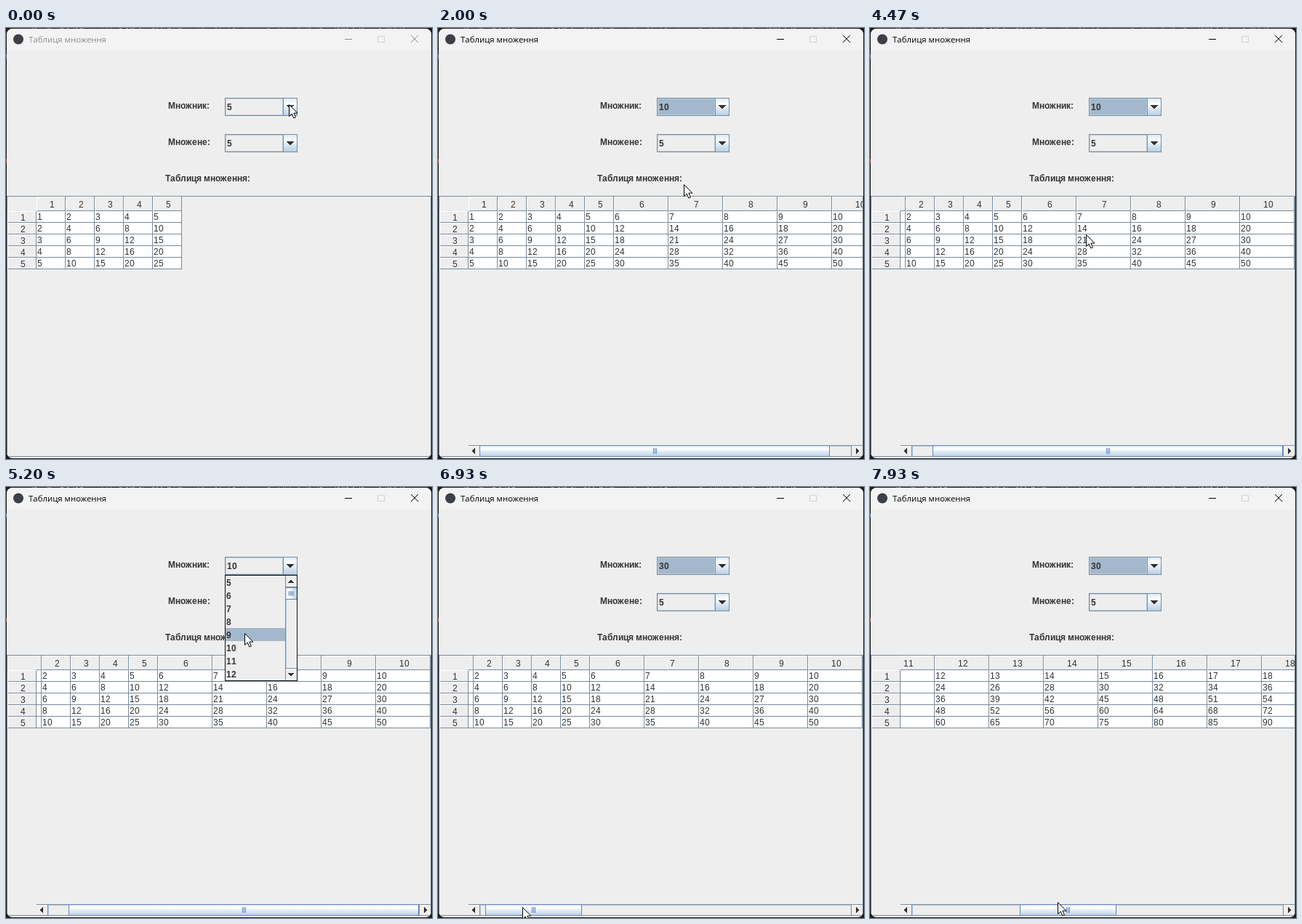
Recreate the animation shown at these times as an HTML page with a canvas. Size 586 by 593 pixels, loop 8 s.

```html
<!DOCTYPE html>
<html lang="uk">
<head>
<meta charset="utf-8">
<title>Таблиця множення</title>
<style>
html, body { margin: 0; width: 586px; height: 593px; overflow: hidden; background: #1c1c1e; }
canvas { display: block; }
</style>
</head>
<body>
<canvas id="stage" width="586" height="593"></canvas>
<script>
const g = document.getElementById('stage').getContext('2d', { alpha: false });
const LOOP = 8000, STEP = 1000 / 15;
const PANEL = '#eeeeee', LINE = '#7a8a99', SOFT = '#b8cfe5', INK = '#333333', PICK = '#a3b8cc', EDGE = '#6382bf';
const SANS = '"Liberation Sans", Arial, sans-serif';
const PLAIN = '12px ' + SANS, BOLD = 'bold 12px ' + SANS;
const TITLE = '11.4px "Open Sans", "Noto Sans", sans-serif';

const clamp = (v, lo, hi) => Math.max(lo, Math.min(hi, v));
const progress = (f, a, b) => clamp((f - a) / (b - a), 0, 1);
const smooth = p => p * p * (3 - 2 * p);
const drag = p => p ** 1.146;

// Pointer legs: first step, last step, end x, end y, easing
const legs = [
  [0, 1, 389, 106, smooth],
  [8, 17, 338, 215, smooth],
  [36, 49, 118, 571, smooth],
  [49, 53, 110, 579, smooth],
  [55, 58.5, 139, 577, drag],
  [60, 72, 393, 108, smooth],
  [73, 78, 328, 201, smooth],
  [78, 81, 331, 238, smooth],
  [88, 91, 329, 255, smooth],
  [93, 104, 116, 578, smooth],
  [107, 119, 258, 571, drag]
];

function mouseAt(f) {
  let x = 389, y = 105;
  for (const [a, b, tx, ty, ease] of legs) {
    const k = ease(progress(f, a, b));
    x += (tx - x) * k;
    y += (ty - y) * k;
  }
  return [Math.round(x), Math.round(y)];
}

const scrollAt = f => Math.round(33 * drag(progress(f, 55, 58.5)) + 570 * drag(progress(f, 107, 119)));
const wheelAt = f => 3 * clamp(f - 81, 0, 6);

function fill(x, y, w, h, color) {
  g.fillStyle = color;
  g.fillRect(x, y, w, h);
}

function outline(x, y, w, h, color) {
  g.strokeStyle = color;
  g.lineWidth = 1;
  g.strokeRect(x + 0.5, y + 0.5, w - 1, h - 1);
}

// Widget text advances by whole pixels
const advance = c => Math.round(g.measureText(c).width);

function text(s, x, y, font = PLAIN) {
  g.font = font;
  g.fillStyle = INK;
  for (const c of String(s)) {
    g.fillText(c, x, y);
    x += advance(c);
  }
}

function centred(s, x, w, y) {
  g.font = PLAIN;
  const tw = [...String(s)].reduce((sum, c) => sum + advance(c), 0);
  text(s, Math.round(x + (w - tw) / 2 + 1), y);
}

// Stepped arrow: tip between (x, y) and its neighbour, growing along (dx, dy)
function arrow(x, y, dx, dy, n) {
  for (let i = 0; i < n; i++) {
    if (dy) fill(x - i - 1, y + i * dy, 2 * i + 2, 1, INK);
    else fill(x + i * dx, y - i - 1, 1, 2 * i + 2, INK);
  }
}

function clipped(x, y, w, h, draw) {
  g.save();
  g.beginPath();
  g.rect(x, y, w, h);
  g.clip();
  draw();
  g.restore();
}

function gloss(x, y, w, h, across) {
  const s = across ? g.createLinearGradient(x, 0, x + w, 0) : g.createLinearGradient(0, y, 0, y + h);
  s.addColorStop(0, '#dde8f3');
  s.addColorStop(0.3, '#ffffff');
  s.addColorStop(0.6, '#dde8f3');
  s.addColorStop(1, SOFT);
  fill(x, y, w, h, s);
}

function backdrop() {
  fill(0, 0, 586, 593, '#1c1c1e');
  let seed = 7;
  for (let x = 30; x < 550; x += 3) {
    seed = (seed * 16807) % 2147483647;
    if (seed % 5 < 2) fill(x, 0, 1 + seed % 3, 1, '#77777c');
  }
  fill(0, 36, 1, 6, '#4d7090');
  fill(0, 180, 1, 5, '#a04a44');
}

function titleBar(active) {
  const ink = active ? '#000000' : '#8c8c8c';
  fill(0, 0, 586, 31, '#f3f3f3');
  g.fillStyle = '#3c3f45';
  g.beginPath();
  g.arc(17, 15.5, 7, 0, 7);
  g.fill();
  g.font = TITLE;
  g.fillStyle = ink;
  g.fillText('Таблиця множення', 31, 20);
  fill(466, 15, 10, 1, ink);
  outline(511, 11, 10, 9, '#d2d2d2');
  g.strokeStyle = ink;
  g.beginPath();
  g.moveTo(557, 10); g.lineTo(567, 20);
  g.moveTo(567, 10); g.lineTo(557, 20);
  g.stroke();
}

function combo(y, value, focused) {
  outline(301, y, 100, 25, LINE);
  outline(302, y + 1, 79, 23, SOFT);
  if (focused) fill(303, y + 2, 77, 21, PICK);
  gloss(382, y + 1, 18, 23);
  fill(381, y, 1, 25, LINE);
  arrow(391, y + 14, 0, -1, 5);
  text(value, 304, y + 17, BOLD);
}

function headCell(x, y, w, h, n, base) {
  fill(x, y, w, h, PANEL);
  fill(x, y, w - 1, 1, '#ffffff');
  fill(x, y, 1, h - 1, '#ffffff');
  fill(x + w - 1, y, 1, h, LINE);
  fill(x + 1, y + h - 1, w - 1, 1, LINE);
  centred(n, x, w, base);
}

function table(cols, shift) {
  outline(1, 231, 584, 359, LINE);
  fill(42, 590, 543, 1, '#ffffff');
  for (let r = 1; r <= 5; r++) headCell(2, 236 + 16 * r, 40, 16, r, 249 + 16 * r);
  clipped(42, 232, 542, 340, () => {
    for (let c = 1; c <= cols; c++) {
      const wide = c > 5, w = wide ? 75 : 40;
      const x = 42 - shift + (wide ? 200 + 75 * (c - 6) : 40 * (c - 1));
      if (x > 584 || x + w < 42) continue;
      headCell(x, 232, w, 20, c, 247);
      for (let r = 1; r <= 5; r++) {
        const y = 236 + 16 * r;
        fill(x, y, w, 16, LINE);
        fill(x, y, w - 1, 15, '#ffffff');
        text(r * c, x + 1, y + 12);
      }
    }
  });
}

function scrollBar(cols, shift) {
  const all = 200 + 75 * (cols - 5);
  const w = Math.round(511 * 542 / all);
  const x = 57 + Math.round(shift * (511 - w) / (all - 542));
  fill(42, 574, 542, 15, PANEL);
  fill(42, 574, 542, 1, LINE);
  fill(58, 575, 510, 1, SOFT);
  fill(58, 575, 1, 14, SOFT);
  for (const b of [42, 569]) fill(b, 575, 15, 1, '#ffffff');
  for (const b of [57, 568]) fill(b, 574, 1, 15, LINE);
  arrow(47, 582, 1, 0, 4);
  arrow(578, 582, -1, 0, 4);
  gloss(x, 574, w, 16);
  outline(x, 574, w, 16, EDGE);
  const mid = x + Math.floor(w / 2);
  for (const d of [-2, 0, 2]) fill(mid + d, 578, 1, 8, EDGE);
}

function popup(top, lit) {
  fill(301, 121, 100, 146, PANEL);
  clipped(302, 122, 82, 144, () => {
    for (let i = 0; i < 8; i++) {
      const y = 122 + 18 * i;
      if (top + i === lit) fill(302, y, 82, 18, PICK);
      text(5 + top + i, 303, y + 14, BOLD);
    }
  });
  fill(384, 122, 1, 144, LINE);
  fill(385, 138, 1, 111, SOFT);
  for (const y of [137, 249]) fill(384, y, 16, 1, LINE);
  for (const y of [122, 250]) fill(385, y, 15, 1, '#ffffff');
  arrow(392, 128, 0, 1, 4);
  arrow(392, 259, 0, -1, 4);
  const y = 138 + Math.round(top * 94 / 88);
  gloss(384, y, 16, 17, true);
  outline(384, y, 17, 17, EDGE);
  for (const d of [6, 8, 10]) fill(388, y + d, 8, 1, EDGE);
  outline(301, 121, 100, 146, '#111111');
}

function pointer(x, y) {
  g.save();
  g.translate(x + 0.5, y + 0.5);
  g.beginPath();
  [[0, 0], [0, 16], [3.7, 12.5], [6.3, 18.5], [8.9, 17.4], [6.4, 11.6], [11.4, 11.6]].forEach(p => g.lineTo(...p));
  g.closePath();
  g.fillStyle = '#ffffff';
  g.fill();
  g.strokeStyle = '#000000';
  g.lineWidth = 1;
  g.stroke();
  g.restore();
}

const rowAt = y => clamp(Math.floor((y - 122) / 18), 0, 7);

function litItem(f, cols, top) {
  if (f > 81 && f < 89) return rowAt(mouseAt(81)[1]);
  const [x, y] = mouseAt(f);
  return x < 384 && y > 122 ? top + rowAt(y) : cols - 5;
}

function paint(f) {
  const cols = f < 30 ? 5 : f < 94 ? 10 : 30;
  const open = (f >= 9 && f < 30) || (f >= 73 && f < 94);
  const shift = scrollAt(f), top = wheelAt(f);

  backdrop();
  g.save();
  g.beginPath();
  g.roundRect(1, 1, 584, 591, 8);
  g.clip();
  fill(0, 0, 586, 593, PANEL);
  titleBar(f >= 9);
  text('Множник:', 223, 111, BOLD);
  text('Множене:', 223, 161, BOLD);
  text('Таблиця множення:', 219, 211, BOLD);
  combo(96, cols, f >= 30 && !open);
  combo(146, 5, false);
  table(cols, shift);
  if (cols > 5) scrollBar(cols, shift);
  if (open) popup(top, litItem(f, cols, top));
  g.restore();
  pointer(...mouseAt(f));
}

const start = performance.now();
function tick() {
  const t = (performance.now() - start) % LOOP;
  paint(Math.min(119, Math.floor((t + 4) / STEP)));
  requestAnimationFrame(tick);
}
tick();
</script>
</body>
</html>
```
